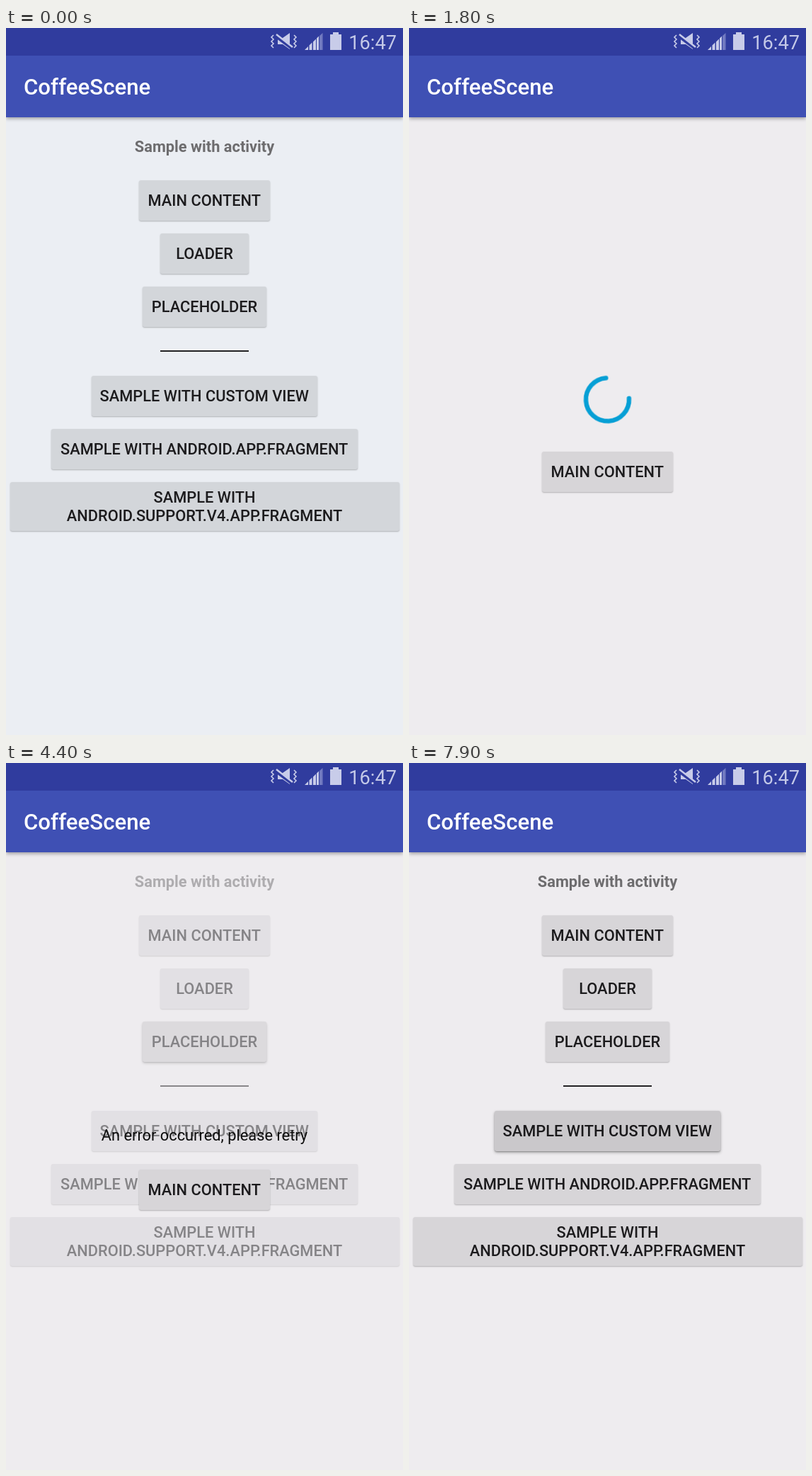
An HTML page that plays this animation: 561 px wide and 998 px high, repeating every 8000 ms.

```html
<!DOCTYPE html>
<html lang="en">
<head>
<meta charset="utf-8">
<title>CoffeeScene</title>
<style>
html, body { margin: 0; width: 100%; height: 100%; overflow: hidden; }
#stage {
  position: relative; width: 561px; height: 998px; overflow: hidden;
  background: #eeecef; color: #1c1b1d;
  font: 21.8px/25.5px Roboto, sans-serif;
  animation: tint 8s linear infinite;
}
#stage > *, .scene > * { position: absolute; }
.scene { inset: 0; }

.status { left: 0; top: 0; width: 561px; height: 39px; background: #303c9e; }
.status svg { position: absolute; left: 0; top: 0; }
.clock { position: absolute; right: 9px; top: 4.5px; font-size: 27.2px; line-height: 32px; color: #c4c9e8; }
.bar { left: 0; top: 39px; width: 561px; height: 87px; background: #3f50b4; box-shadow: 0 2px 5px rgba(0,0,0,.34); }
.bar h1 { position: absolute; margin: 0; left: 25px; top: 27px; font-size: 31.2px; line-height: 36.5px; font-weight: 500; color: #fff; }

.label { left: 0; width: 561px; text-align: center; white-space: nowrap; }
.head { top: 155px; font-weight: 700; color: #6d6c6e; }
.error-text { top: 513px; color: #0c0c0c; }
.line { left: 218px; top: 455px; width: 125px; height: 2px; background: #232224; }

.btn {
  left: var(--x); top: var(--y); width: var(--w); height: 57px;
  display: flex; align-items: center; justify-content: center;
  text-align: center; white-space: nowrap; font-weight: 500;
  background: #d7d5d8; border-radius: 3px; box-shadow: 0 1px 2px rgba(0,0,0,.26);
  animation: btn-tint 8s linear infinite;
}
.btn.tall { height: 69px; }
.press::after {
  content: ""; position: absolute; inset: 0; border-radius: 3px; opacity: 0;
  background: rgba(0,0,0,.06); box-shadow: 0 2px 4px rgba(0,0,0,.28);
  animation: var(--press) 8s step-end infinite;
}

#main { animation: main 8s linear infinite; }
#loader { animation: loader 8s linear infinite; }
#error { animation: error 8s linear infinite; }
.spinner { left: 240px; top: 484px; }
.spinner g { animation: spin 8s linear infinite; }
.spinner circle {
  fill: none; stroke: #069fd5; stroke-width: 6.4; stroke-linecap: round;
  stroke-dasharray: 3 100;
  animation: trim 8s cubic-bezier(.4,0,.2,1) infinite;
}

@keyframes tint {
  0%, 6.24% { background: #ebeef3; }
  6.25%, 9.9% { background: #edeef2; }
  12.5%, 100% { background: #eeecef; }
}
@keyframes btn-tint {
  0%, 6.24% { background: #d3d6da; }
  6.25%, 9.9% { background: #d5d6d9; }
  12.5%, 100% { background: #d7d5d8; }
}
@keyframes main {
  0%, 16.25% { opacity: 1; }
  21.25%, 38.74% { opacity: 0; }
  38.75%, 52.5% { opacity: 1; }
  57.5%, 74.99% { opacity: 0; }
  75%, 100% { opacity: 1; }
}
@keyframes loader {
  0%, 17.49% { opacity: 0; }
  17.5%, 37.5% { opacity: 1; }
  42.5%, 100% { opacity: 0; }
}
@keyframes error {
  0%, 52.49% { opacity: 0; }
  52.5%, 73.75% { opacity: 1; }
  77.5%, 100% { opacity: 0; }
}
@keyframes spin {
  0%, 16.54% { transform: rotate(-90deg); }
  32.64% { transform: rotate(144deg); }
  32.641% { transform: rotate(54deg); }
  48.74%, 100% { transform: rotate(288deg); }
}
@keyframes trim {
  0%, 16.54% { stroke-dasharray: 3 100; stroke-dashoffset: 0; }
  24.59% { stroke-dasharray: 78 100; stroke-dashoffset: 0; }
  32.64% { stroke-dasharray: 3 100; stroke-dashoffset: -75; }
  32.641% { stroke-dasharray: 3 100; stroke-dashoffset: 0; }
  40.69% { stroke-dasharray: 78 100; stroke-dashoffset: 0; }
  48.74%, 100% { stroke-dasharray: 3 100; stroke-dashoffset: -75; }
}
@keyframes press-loader { 16.25% { opacity: 1; } 25% { opacity: 0; } }
@keyframes press-back { 37.5% { opacity: 1; } 45% { opacity: 0; } }
@keyframes press-holder { 50% { opacity: 1; } 60% { opacity: 0; } }
@keyframes press-retry { 67.5% { opacity: 1; } 80% { opacity: 0; } }
@keyframes press-custom { 98.75% { opacity: 1; } }
</style>
</head>
<body>
<div id="stage">
  <div class="scene" id="main">
    <div class="label head">Sample with activity</div>
    <div class="btn" style="--x:188px;--y:215px;--w:184.5px">MAIN CONTENT</div>
    <div class="btn press" style="--x:218px;--y:290px;--w:125px;--press:press-loader">LOADER</div>
    <div class="btn press" style="--x:193px;--y:365px;--w:175px;--press:press-holder">PLACEHOLDER</div>
    <div class="line"></div>
    <div class="btn press" style="--x:120.5px;--y:491px;--w:319.5px;--press:press-custom">SAMPLE WITH CUSTOM VIEW</div>
    <div class="btn" style="--x:64px;--y:566px;--w:432.5px">SAMPLE WITH ANDROID.APP.FRAGMENT</div>
    <div class="btn tall" style="--x:5.5px;--y:641px;--w:550px">SAMPLE WITH<br>ANDROID.SUPPORT.V4.APP.FRAGMENT</div>
  </div>

  <div class="scene" id="loader">
    <svg class="spinner" width="81" height="81" viewBox="-40.5 -40.5 81 81">
      <g><circle r="30.5" pathLength="100"/></g>
    </svg>
    <div class="btn press" style="--x:188px;--y:598px;--w:184.5px;--press:press-back">MAIN CONTENT</div>
  </div>

  <div class="scene" id="error">
    <div class="label error-text">An error occurred, please retry</div>
    <div class="btn press" style="--x:188px;--y:574px;--w:184.5px;--press:press-retry">MAIN CONTENT</div>
  </div>

  <div class="bar"><h1>CoffeeScene</h1></div>
  <div class="status">
    <svg width="561" height="39" fill="#c8cce9">
      <path d="M384 14h7l10-7v23l-10-7h-7z"/>
      <path d="M381 11l24 18" stroke="#303c9e" stroke-width="5"/>
      <path d="M382 9l23 18" stroke="#c8cce9" stroke-width="2.4"/>
      <path d="M378 10l-3 3 3 3-3 3 3 3-3 3 3 3M407 10l3 3-3 3 3 3-3 3 3 3-3 3" fill="none" stroke="#c8cce9" stroke-width="1.6"/>
      <path d="M422 31l5-5v5zM428.500 31v-6.500l4-4v10.500zM434 31v-11.500l4-4v15.500zM439 31v-16.500l3-3v19.500z"/>
      <path d="M443 31v-20l4.500-4v24z" fill="#717ac0"/>
      <path d="M458 9h4v-3h8v3h4v22h-16z"/>
    </svg>
    <div class="clock">16:47</div>
  </div>
</div>
<script>
// Run the keyframes at ten pictures a second.
const LOOP = 8000, STEP = 100;
const anims = document.getAnimations();
anims.forEach(a => a.pause());
const start = performance.now();

function draw() {
  const t = (performance.now() - start) % LOOP;
  const tick = Math.floor(t / STEP) * STEP + 1;
  for (const a of anims) a.currentTime = tick;
  requestAnimationFrame(draw);
}
draw();
</script>
</body>
</html>
```
